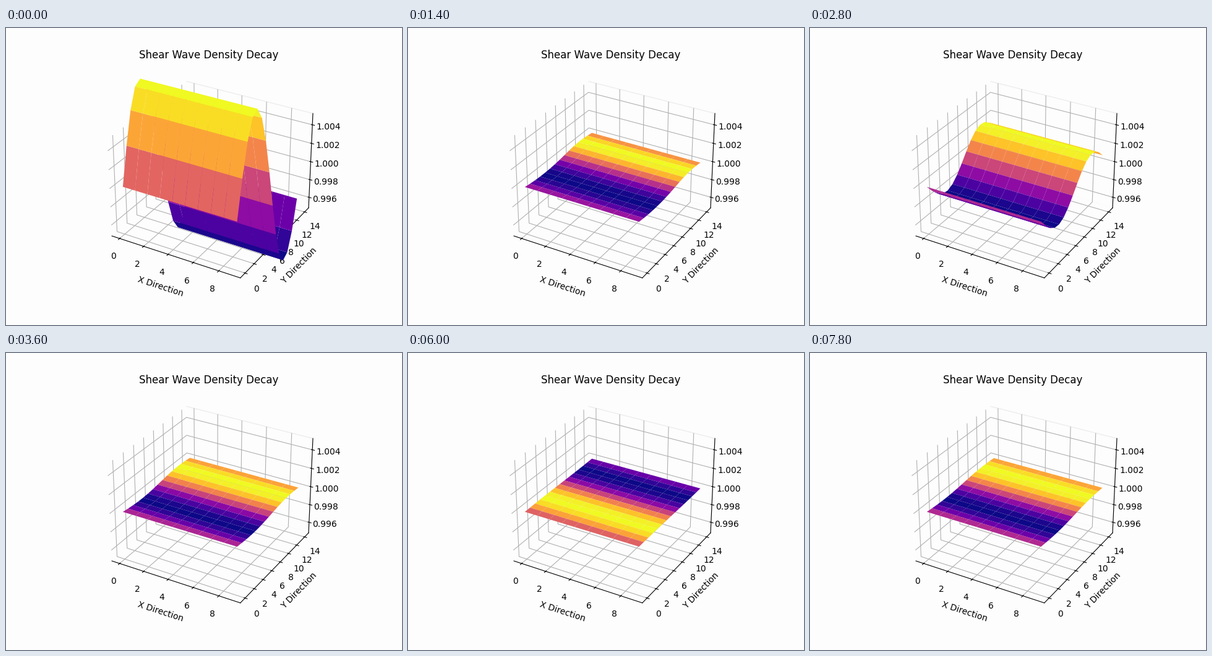
Recreate the animation shown at these times as a matplotlib script. Size 640 by 480 pixels, loop 8000 ms.

```python
import matplotlib.pyplot as plt
import numpy as np
from matplotlib.animation import FuncAnimation

NX, NY = 10, 15
FRAMES, INTERVAL = 40, 200
OMEGA = 0.5      # relaxation rate
EPS = 0.01       # initial density amplitude
PAPER = "#fdfdfd"

# Nothing varies along x, so three lattice velocities along y are enough.
C = np.array([0, 1, -1])[:, None]
W = np.array([2 / 3, 1 / 6, 1 / 6])[:, None]


def equilibrium(rho, u):
    cu = C * u
    return W * rho * (1 + 3 * cu + 4.5 * cu**2 - 1.5 * u**2)


def density_history(steps):
    """Density profile along y after each lattice Boltzmann step."""
    rho = 1 + EPS * np.sin(2 * np.pi * np.arange(NY) / NY)
    f = equilibrium(rho, np.zeros(NY))
    history = []
    for _ in range(steps):
        f = np.array([np.roll(fi, c) for fi, c in zip(f, C[:, 0])])
        rho = f.sum(axis=0)
        u = (C * f).sum(axis=0) / rho
        f += OMEGA * (equilibrium(rho, u) - f)
        history.append(rho)
    return history


def padded(low, high, margin):
    """Limits widened by a data margin and then by the 1/48 view margin."""
    pad = (high - low) * margin
    low, high = low - pad, high + pad
    pad = (high - low) / 48
    return low - pad, high + pad


X, Y = np.meshgrid(np.arange(NX), np.arange(NY))
profiles = density_history(FRAMES)

fig = plt.figure(figsize=(6.4, 4.8), dpi=100, facecolor=PAPER)
ax = fig.add_subplot(projection="3d", facecolor=PAPER)
ax.set_xlim(*padded(0, NX - 1, 0.05))
ax.set_ylim(*padded(0, NY - 1, 0.05))
ax.set_zlim(*padded(0.995, 1.005, 0))
ax.set_title("Shear Wave Density Decay")
ax.set_xlabel("X Direction")
ax.set_ylabel("Y Direction")
for axis in (ax.xaxis, ax.yaxis, ax.zaxis):
    axis.set_pane_color((0.992, 0.992, 0.992, 1.0))
ax.yaxis.pane.set_edgecolor("0.93")


def draw(frame):
    for old in list(ax.collections):
        old.remove()
    Z = np.repeat(profiles[frame][:, None], NX, axis=1)
    return [ax.plot_surface(X, Y, Z, cmap="plasma")]


def start():
    return draw(0)


anim = FuncAnimation(fig, draw, frames=FRAMES, init_func=start,
                     interval=INTERVAL, repeat=True, blit=False)
plt.show()
```
